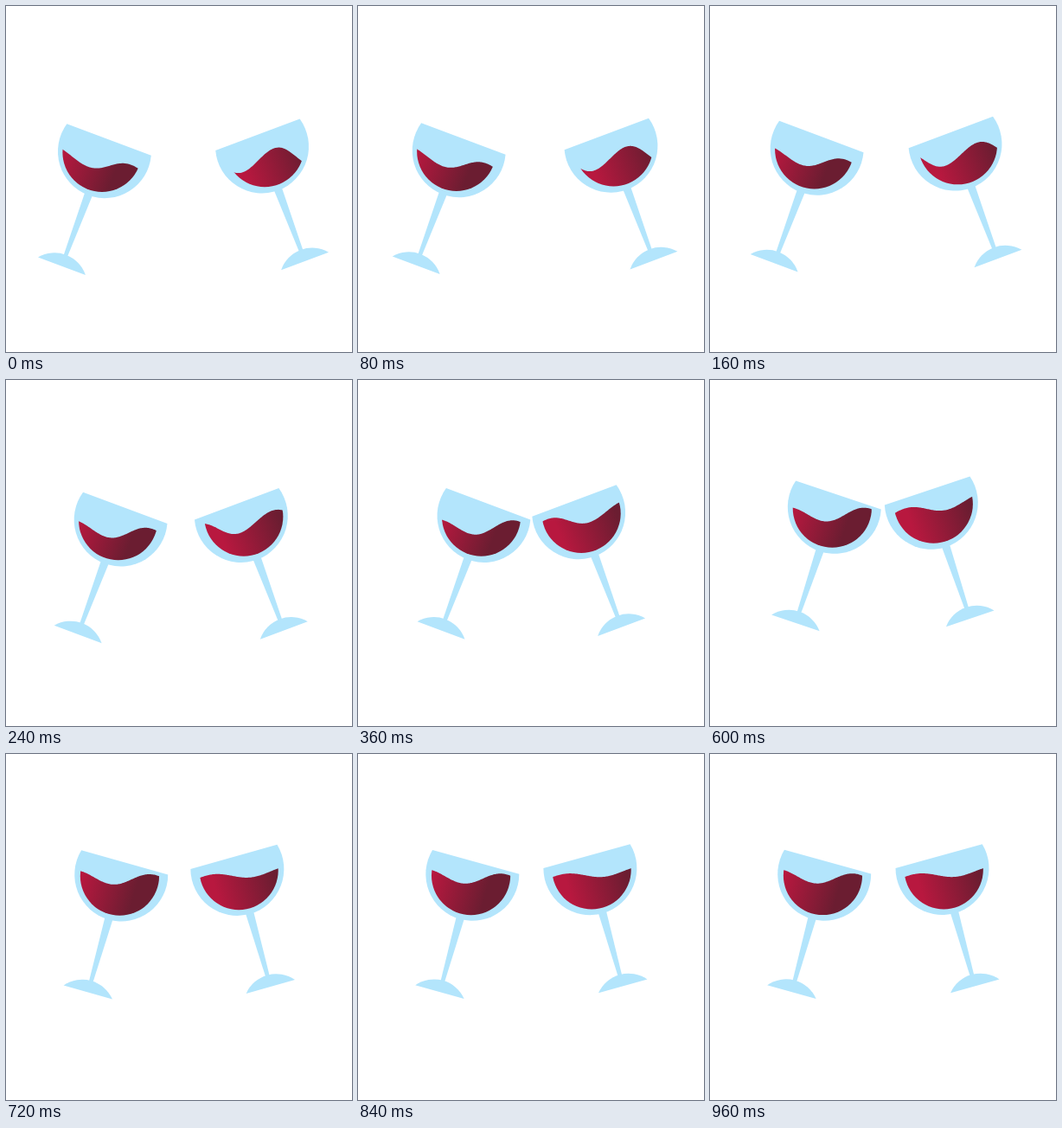
An HTML page for the animation above (1.92 s loop, 400x400 px).

```html
<!DOCTYPE html>
<html lang="en">
<head>
<meta charset="utf-8">
<title>Cheers</title>
<style>
  html, body { margin: 0; width: 100%; height: 100%; overflow: hidden; background: #fff; }
  svg { display: block; width: 100%; height: 100%; }
  .glass { fill: #b3e5fc; }
  .bright { stop-color: #b8183f; }
  .dark { stop-color: #6b1d31; }
</style>
</head>
<body>
<svg viewBox="0 0 400 400">
  <defs>
    <linearGradient id="wineL" gradientUnits="userSpaceOnUse" x1="-44" y1="0" x2="22" y2="0">
      <stop class="bright" offset="0"/>
      <stop class="dark" offset="1"/>
    </linearGradient>
    <linearGradient id="wineR" gradientUnits="userSpaceOnUse" x1="-32" y1="0" x2="38" y2="0">
      <stop class="bright" offset="0"/>
      <stop class="dark" offset="1"/>
    </linearGradient>
    <clipPath id="bowl"><circle r="45.6"/></clipPath>
    <g id="glass">
      <path d="M-52 -14.5 A54 54 0 1 0 52 -14.5 Z"/>
      <path d="M-4.8 50 H4.8 L2.3 131 H-2.3 Z"/>
      <path d="M-29.3 141.5 A38 38 0 0 1 29.3 141.5 Z"/>
    </g>
  </defs>
  <use id="glassL" class="glass" href="#glass"/>
  <use id="glassR" class="glass" href="#glass"/>
  <g id="liquidL" clip-path="url(#bowl)"><path id="waveL" fill="url(#wineL)"/></g>
  <g id="liquidR" clip-path="url(#bowl)"><path id="waveR" fill="url(#wineR)"/></g>
</svg>
<script>
const LOOP = 1920, STEP = 40, R = 47, WAVELENGTH = 87;
const $ = id => document.getElementById(id);
const mix = (a, b, p) => a + (b - a) * p;
const smooth = (t, from, to) => {
  const p = Math.min(1, Math.max(0, (t - from) / (to - from)));
  return p * p * (3 - 2 * p);
};

// Swing back: quick ease, then a faint settling tail
function settle(t, from) {
  if (t <= 720) return smooth(t, from, 760);
  const rest = Math.max(0, 1 - (t - 720) / 240);
  return 1 - (1 - smooth(720, from, 760)) * rest ** 3;
}

// Each value is given at the start, at the clink and at rest
const sides = [
  {
    id: 'L', dir: 1,
    x: [114, 151.4, 132.2], y: [168.1, 154.8, 138.7],
    level: [13.2, 12, 2.6], amp: [7.5, 8.7, 7], tilt: [0.25, -0.03, 0.06], crest: [-13, -6, -8]
  },
  {
    id: 'R', dir: -1,
    x: [296, 247.5, 268.5], y: [162.4, 151.4, 132],
    level: [14, 3, 5.5], amp: [12.5, 7, 4], tilt: [-0.1, -0.27, -0.1], crest: [-29, 14, 14]
  }
];

// The surface is a tilted cosine; the bowl clips it
function wavePath(level, amp, tilt, crest) {
  let d = `M${R} ${R}H${-R}`;
  for (let x = -R; x <= R; x++) {
    const y = level + tilt * x + amp * Math.cos(2 * Math.PI * (x - crest) / WAVELENGTH);
    d += `L${x} ${y.toFixed(2)}`;
  }
  return d + 'Z';
}

function drawSide(side, t) {
  const { id, dir } = side;
  const go = smooth(t, 0, 480), back = settle(t, 480), lift = settle(t, 440);
  const at = ([start, hit, end], p = back) => mix(start, hit, go) + (end - hit) * p;

  const x = at(side.x), y = at(side.y, lift);
  const angle = dir * mix(20.5, 15.5, back);
  const a = angle * Math.PI / 180;
  const ox = dir * mix(-2.4, -1.2, back), oy = 2.2;
  const wx = x + ox * Math.cos(a) - oy * Math.sin(a);
  const wy = y + ox * Math.sin(a) + oy * Math.cos(a);

  $('glass' + id).setAttribute('transform', `translate(${x} ${y}) rotate(${angle})`);
  $('wine' + id).setAttribute('gradientTransform', `rotate(${angle})`);
  $('liquid' + id).setAttribute('transform', `translate(${wx} ${wy})`);
  $('wave' + id).setAttribute('d', wavePath(at(side.level, lift), at(side.amp), at(side.tilt), at(side.crest)));
}

const draw = t => sides.forEach(side => drawSide(side, t));

const begin = performance.now();
function tick() {
  const t = (performance.now() - begin) % LOOP;
  draw(Math.floor(t / STEP) * STEP);
  requestAnimationFrame(tick);
}
draw(0);
requestAnimationFrame(tick);
</script>
</body>
</html>
```
